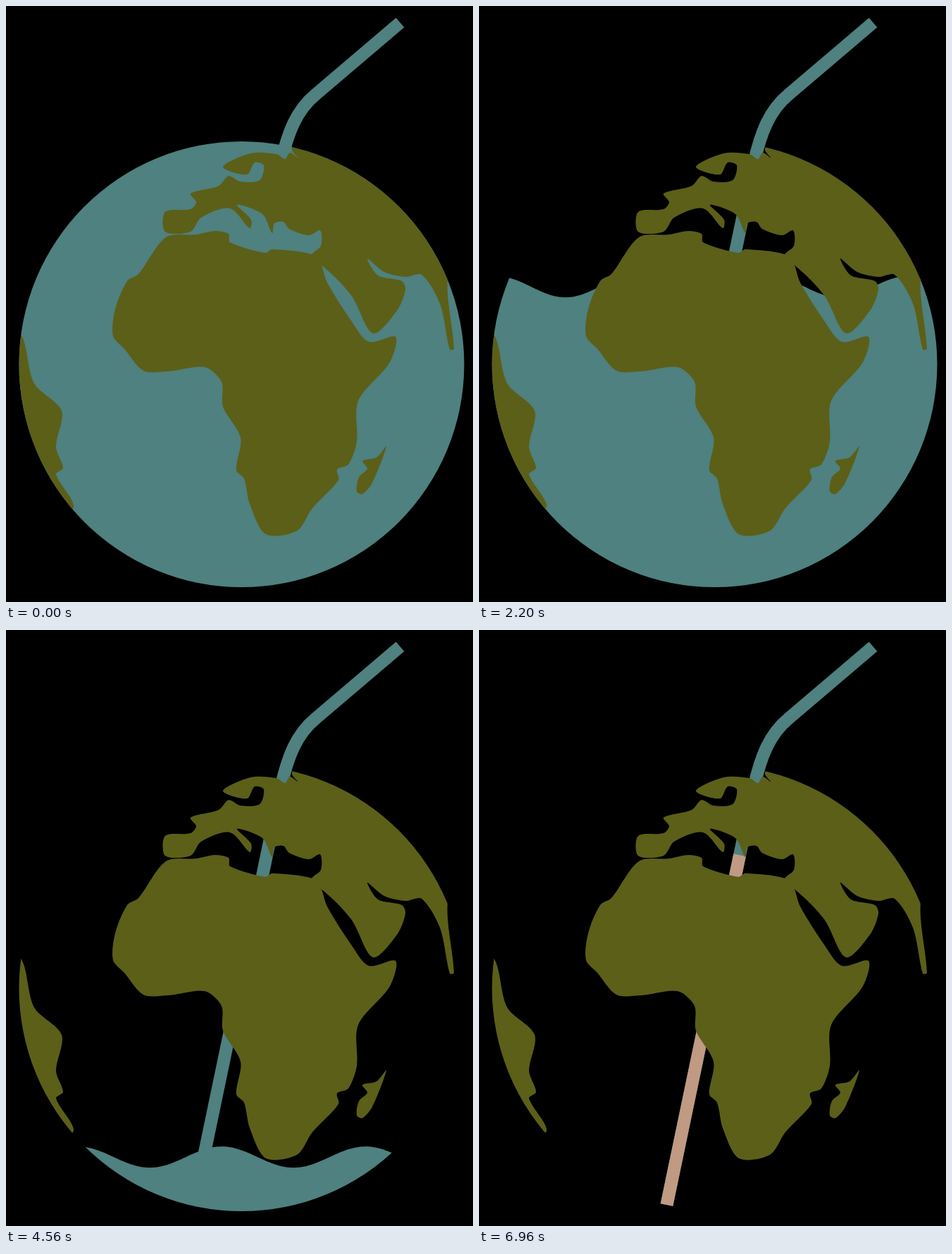
An HTML page with a canvas for the animation above (7 s loop, 663 by 845 pixels).

```html
<!DOCTYPE html>
<html lang="en">
<head>
<meta charset="utf-8">
<title>Drinking the planet</title>
<style>
  html, body { margin: 0; width: 100%; height: 100%; overflow: hidden; background: #000; }
  canvas { display: block; width: 100%; height: 100%; }
</style>
</head>
<body>
<canvas id="stage" width="663" height="845"></canvas>
<script>
const ctx = document.getElementById('stage').getContext('2d');
const W = 663, H = 845, LOOP = 7000, STEP = 40;
const SEA = '#4e817f', LAND = '#5c5f18', AIR = '#c09a83';
const GLOBE = { x: 334.5, y: 508, r: 316 };
const FOOT = { x: 266.5, y: 815 };

// Smooth closed curve through a few key points; sharp turns stay sharp
function coast(text) {
  const pts = text.trim().split(/\s+/).map(p => p.split(',').map(Number));
  const at = i => pts[(i + pts.length) % pts.length];
  const dist = (p, q) => Math.hypot(q[0] - p[0], q[1] - p[1]);
  const handle = (i, side) => {
    const p = at(i), prev = at(i - 1), next = at(i + 1);
    const k = side * 0.3 * dist(p, at(i + side)) / (dist(prev, p) + dist(p, next));
    return [p[0] + (next[0] - prev[0]) * k, p[1] + (next[1] - prev[1]) * k];
  };
  const path = new Path2D();
  path.moveTo(...at(0));
  pts.forEach((p, i) => path.bezierCurveTo(...handle(i, 1), ...handle(i + 1, -1), ...at(i + 1)));
  path.closePath();
  return path;
}

const africa = coast(`
  227,328 270,324 296,319 316,323 318,335 368,350 378,345 434,352 447,366 456,392
  490,446 515,476 553,469 545,505 500,560 498,618 486,650 470,657 472,672 435,712
  413,744 369,749 346,706 338,670 327,658 333,612 308,568 306,533 282,512 230,518
  195,517 168,486 152,468 155,430 172,390 188,380`);

// Runs past the rim of the globe, which trims it
const eurasia = coast(`
  226,320 226,292 262,288 270,278 262,266 302,255 316,241 333,249 360,247 366,226
  353,222 342,239 308,228 347,209 384,210 396,217 403,208 414,215 406,204 412,190
  520,190 650,330 627,386 636,486 630,487 616,422 590,381 567,384 537,377 513,358
  528,382 562,390 567,402 555,432 521,464 490,410 447,367 430,365 434,352 447,340
  446,318 430,325 402,316 394,306 381,308 378,322 364,295 328,282 348,303 346,315
  318,287 277,300 262,320`);

const southAmerica = coast(`
  22,467 40,535 79,574 71,625 81,655 71,664 96,710 60,720 0,560 0,467`);

const madagascar = coast(`
  540,624 520,676 506,692 498,688 501,668 513,656 506,645 526,640`);

const lands = [africa, eurasia, southAmerica, madagascar];

const disc = new Path2D();
disc.arc(GLOBE.x, GLOBE.y, GLOBE.r, 0, Math.PI * 2);

const strawX = y => FOOT.x + (FOOT.y - y) * 0.209;
const straw = new Path2D();
straw.moveTo(559.5, 23.5);
straw.lineTo(439.5, 125.5);
straw.bezierCurveTo(412, 148, 400, 180, strawX(222), 222);
straw.lineTo(FOOT.x, FOOT.y);

// Mean water level: slow start, steady middle, slow end
function level(t) {
  const u = Math.min(t, 5800) - 2900;
  return 506.5 + 0.157 * u - 4.33e-9 * u ** 3;
}

// Wave phase at mid-stage, in cycles: runs right, slowing slightly
function phase(t) {
  const s = t / 1000;
  return 2.095 - 1.237 * s + 0.0295 * s * s;
}

function drawWater(t) {
  const mid = level(t), shift = phase(t);
  const wavelength = 185 + t * 0.0042;
  ctx.beginPath();
  ctx.moveTo(0, H);
  for (let x = 0; x <= W + 2; x += 3) {
    const cycles = (x - 320) / wavelength + shift;
    ctx.lineTo(x, mid - 15 * Math.cos(cycles * Math.PI * 2));
  }
  ctx.lineTo(W + 2, H);
  ctx.fillStyle = SEA;
  ctx.fill();
}

function drawStraw(t) {
  ctx.lineWidth = 18;
  ctx.strokeStyle = SEA;
  ctx.stroke(straw);
  const front = FOOT.y - 0.313 * (t - 5376);
  if (front >= FOOT.y) return;
  ctx.strokeStyle = AIR;
  ctx.beginPath();
  ctx.moveTo(FOOT.x, FOOT.y);
  ctx.lineTo(strawX(front), front);
  ctx.stroke();
}

function draw(t) {
  ctx.fillStyle = '#000';
  ctx.fillRect(0, 0, W, H);
  drawStraw(t);
  ctx.save();
  ctx.clip(disc);
  drawWater(t);
  ctx.fillStyle = LAND;
  lands.forEach(shape => ctx.fill(shape));
  ctx.restore();
}

const start = performance.now();
function tick() {
  const t = (performance.now() - start) % LOOP;
  draw(Math.floor(t / STEP) * STEP);
  requestAnimationFrame(tick);
}
tick();
</script>
</body>
</html>
```
